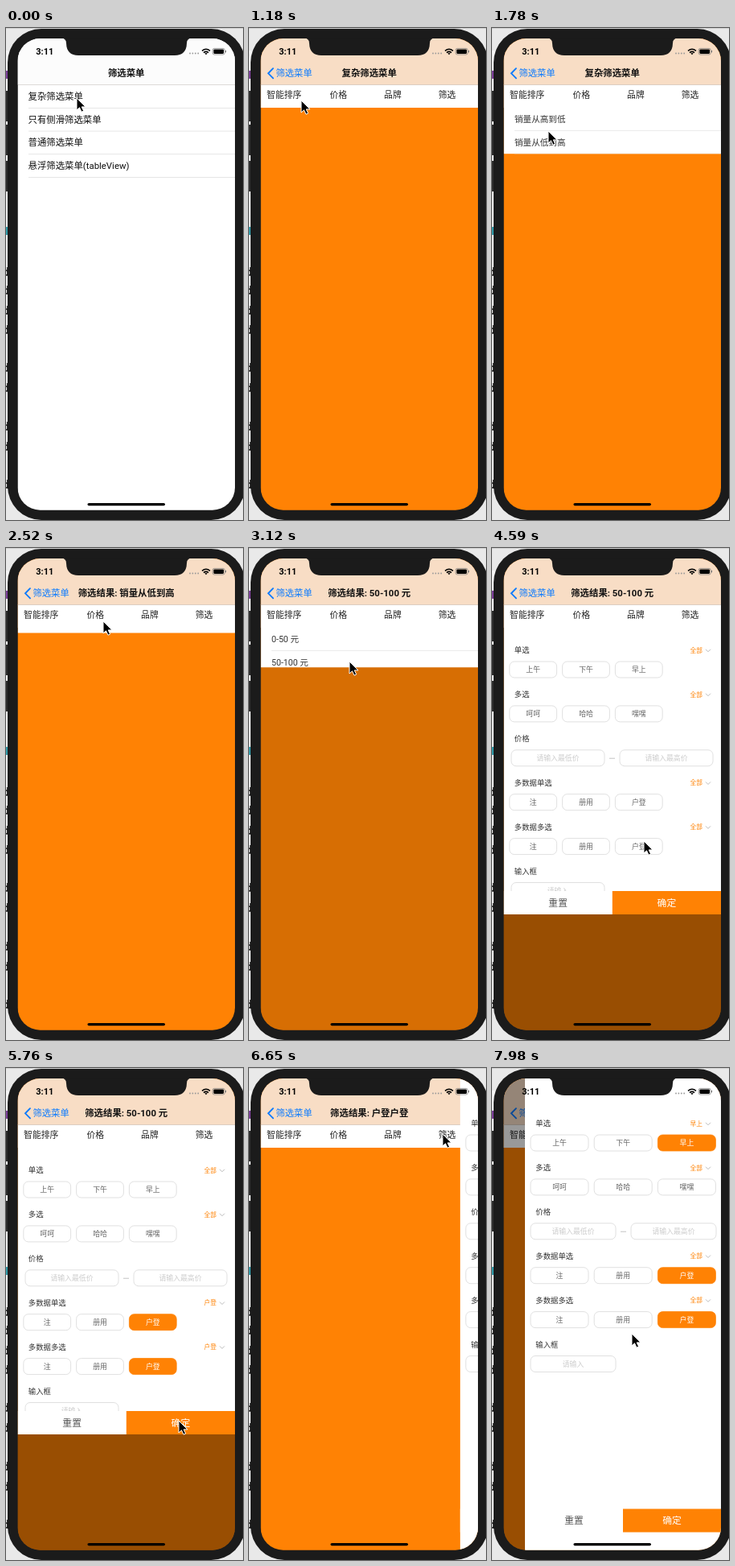
Write an HTML page that moves like this. It is 295 by 611 pixels and loops after 8000 ms.

```html
<!DOCTYPE html>
<html lang="zh-CN">
<head>
<meta charset="utf-8">
<title>筛选菜单</title>
<style>
html, body { margin: 0; width: 100%; height: 100%; overflow: hidden; background: #e9e9e9; }
svg { display: block; width: 295px; height: 611px; }
text { font-family: Roboto, "Noto Sans CJK SC", "Noto Sans CJK", sans-serif; white-space: pre; }
</style>
</head>
<body>
<svg id="stage" viewBox="0 0 295 611"></svg>
<script>
const LOOP = 8000, STEP = 147.5, LEFT = 14.5, WIDTH = 270.5;
const ORANGE = '#ff8204', BLUE = '#0a7aff', BEZEL = '#1b1b1b';
const stage = document.getElementById('stage');

const ramp = (t, start, span) => Math.min(1, Math.max(0, (t - start) / span));
const ease = (t, start, span) => { const p = ramp(t, start, span); return p * p * (3 - 2 * p); };
const mix = (a, b, p) => a + (b - a) * p;

const rect = (x, y, w, h, fill, more = '') =>
  `<rect x="${x}" y="${y}" width="${w}" height="${h}" fill="${fill}" ${more}/>`;
const path = (d, fill, more = '') => `<path d="${d}" fill="${fill}" ${more}/>`;
const line = (x, y, w, color) => rect(x, y, w, 0.7, color);
const text = (s, x, mid, size, fill, anchor = 'start', more = '') =>
  `<text x="${x}" y="${mid + size * 0.36}" font-size="${size}" fill="${fill}" text-anchor="${anchor}" ${more}>${s}</text>`;
const group = (more, body) => `<g ${more}>${body}</g>`;
const shift = (x, y, body) => group(`transform="translate(${x} ${y})"`, body);
const shade = (y, h, amount) => rect(LEFT, y, WIDTH, h, '#000', `opacity="${0.4 * amount}"`);

// Pointer stops: time, x, y
const stops = [
  [600, 88, 87], [1190, 65, 90], [1330, 65, 90], [1780, 70, 128], [1930, 75, 142],
  [2220, 80, 140], [2517, 121, 91], [2600, 121, 91], [2950, 125, 141], [3120, 125, 141],
  [3500, 167, 91], [3697, 167, 91], [3992, 180, 162], [4582, 189, 364], [4870, 189, 364],
  [5025, 190, 318], [5300, 190, 318], [5620, 215, 438], [5765, 215, 438], [6350, 241, 82],
  [6650, 241, 82], [7090, 240, 88], [7385, 238, 92], [7532, 221, 199], [7975, 174, 330]
];

function pointer(t) {
  let i = 1;
  while (i < stops.length - 1 && t > stops[i][0]) i++;
  const [t0, x0, y0] = stops[i - 1], [t1, x1, y1] = stops[i];
  const p = ramp(t, t0, t1 - t0);
  return shift(mix(x0, x1, p), mix(y0, y1, p), path('M0 0V15L3.5 11.8L6 17.2L8.6 16L6.2 10.9H11Z',
    '#000', 'stroke="#fff" stroke-width="1" stroke-linejoin="round"'));
}

function box(x, y, w, label, on, color = '#666') {
  return rect(x, y, w, 20, on ? ORANGE : '#fff', `rx="6" stroke="${on ? ORANGE : '#d8d8d8'}" stroke-width=".8"`) +
    text(label, x + w / 2, y + 10, 8.9, on ? '#fff' : color, 'middle');
}

// Filter sections, with the first heading centred on y = 0
function form(o) {
  const field = (x, y, label) => box(x, y, o.fieldWidth, label, false, '#ccc');
  const rows = [
    ['单选', '上午', '下午', '早上'], ['多选', '呵呵', '哈哈', '嘿嘿'], ['价格'],
    ['多数据单选', '注', '册用', '户登'], ['多数据多选', '注', '册用', '户登'], ['输入框']
  ];
  return rows.map(([name, ...choices], i) => {
    let s = text(name, 13.3, 0, 9.4, '#333');
    if (choices.length) {
      s += text(o.tags[i] || '全部', o.tagX, 0, 7.7, ORANGE, 'end') +
        path(`M${o.tagX + 4} -1.2l3 3l3 -3`, 'none', 'stroke="#aaa" stroke-width=".8"');
      s += choices.map((c, k) => box(o.x + k * o.pitch, 14, o.width, c, k == 2 && o.on[i])).join('');
    } else if (i == 2) {
      s += field(o.fieldX, 14, '请输入最低价') + field(o.fieldX2, 14, '请输入最高价') +
        line(o.fieldX2 - 13, 24, 7, '#aaa');
    } else s += field(o.fieldX, 14, '请输入');
    return shift(0, i * 54.9, s);
  }).join('');
}

function buttons(y, split, width) {
  return rect(0, y, split, 29, '#fff') + rect(split, y, width - split, 29, ORANGE) +
    text('重置', split / 2, y + 14.5, 11.8, '#555', 'middle') +
    text('确定', (split + width) / 2, y + 14.5, 11.8, '#fff', 'middle');
}

function list(items) {
  return items.map((s, i) => text(s, 13.5, 14.4 + i * 28.7, 10.6, '#333') +
    line(13.5, 28 + i * 28.7, WIDTH, '#e4e4e4')).join('');
}

// Menus that unfold below the tabs
const menus = [
  { open: 1270, close: 2000, full: 57.4, body: () => list(['销量从高到低', '销量从低到高']) },
  { open: 2430, close: 2950, full: 86.1, body: () => list(['0-50 元', '50-100 元', '100-150 元']) },
  { open: 3568, close: 5790, full: 356, body: (t, h) => shift(0, 28, form({
      x: 7.3, pitch: 65.8, width: 58.8, fieldX: 9.5, fieldX2: 144.5, fieldWidth: 116, tagX: 247.5,
      on: { 3: t >= 5310, 4: t >= 4870 }, tags: { 3: t >= 5310 && '户登', 4: t >= 4870 && '户登' }
    })) + buttons(h - 29, 135.3, WIDTH) }
];

function dropdown(t) {
  return menus.map(m => {
    const h = m.full * (ease(t, m.open, 514) - ease(t, m.close, 350));
    if (h <= 0) return '';
    const dim = ramp(t, m.open + 514, 200) * (1 - ramp(t, m.close, 300));
    return shade(99, 500, dim) +
      `<clipPath id="fold">${rect(0, 0, WIDTH, h, '#000')}</clipPath>` +
      shift(LEFT, 99, group('clip-path="url(#fold)"', rect(0, 0, WIDTH, h, '#fff') + m.body(t, h)));
  }).join('');
}

function drawer(t) {
  const p = ease(t, 6552, 514), w = 244;
  if (!p) return '';
  return shade(13, 586, ramp(t, 7066, 200)) + shift(285 - w * p, 0, rect(0, 13, w, 586, '#fff') +
    shift(0, 69, form({
      x: 7, pitch: 79.2, width: 72, fieldX: 7, fieldX2: 132, fieldWidth: 106, tagX: 221,
      on: { 0: t >= 7380, 3: true, 4: true }, tags: { 0: t >= 7380 && '早上' }
    })) + buttons(547.5, 122, w));
}

function home(t) {
  const rows = ['复杂筛选菜单', '只有侧滑筛选菜单', '普通筛选菜单', '悬浮筛选菜单(tableView)'];
  return rect(LEFT, 13, WIDTH, 586, '#fff') + rect(LEFT, 13, WIDTH, 57, '#fcfcfc') +
    (t >= 600 ? rect(LEFT, 71, WIDTH, 28.5, '#d9d9d9') : '') +
    rows.map((s, i) => text(s, 27.5, 84.7 + i * 28.8, 11.4, '#111') +
      line(28, 99 + i * 28.7, 257, '#dcdcdc')).join('');
}

function page() {
  const tabs = ['智能排序', '价格', '品牌', '筛选'];
  return rect(LEFT, 13, WIDTH, 586, ORANGE) + rect(LEFT, 13, WIDTH, 57.5, '#f8ddc5') +
    rect(LEFT, 70.5, WIDTH, 28.5, '#fff') +
    tabs.map((s, i) => text(s, 43.7 + i * 67.6, 83.2, 10.8, '#222', 'middle')).join('');
}

function navigation(t, p) {
  const bold = 'font-weight="600"';
  const result = t < 2000 ? '' : t < 2950 ? '销量从低到高' : t < 5790 ? '50-100 元' : '户登户登';
  const title = result ? '筛选结果: ' + result : '复杂筛选菜单';
  return line(LEFT, 70, WIDTH, '#cfcbc8') +
    group(`opacity="${1 - p}"`, text('筛选菜单', mix(149.7, 56, p), 56, 11.4, '#111', 'middle', bold)) +
    group(`opacity="${p}"`, text(title, mix(250, 149.7, p), 56, 11.4, '#111', 'middle', bold) +
      text('筛选菜单', mix(128, 33.5, p), 56, 11.3, BLUE) +
      path('M30 50.2L24 56.3L30 62.4', 'none', `stroke="${BLUE}" stroke-width="1.9" stroke-linecap="round"`));
}

function status() {
  const dots = [0, 1, 2, 3].map(i => `<circle cx="${229 + i * 3.4}" cy="31.5" r=".9" fill="#999"/>`).join('');
  const arc = (r, y) => path(`M${249 - r} ${y}Q249 ${y - r * 0.8} ${249 + r} ${y}`, 'none', 'stroke="#000" stroke-width="1.6"');
  return text('3:11', 48.3, 29.3, 11, '#000', 'middle', 'font-weight="600"') + dots +
    arc(5, 28.3) + arc(3, 30.6) + path('M247.3 31.6Q249 30.2 250.7 31.6L249 33.3Z', '#000') +
    rect(257.2, 25.4, 15, 7.6, 'none', 'rx="2" stroke="#777" stroke-width=".7"') +
    rect(258.4, 26.5, 12.6, 5.4, '#000', 'rx="1.1"') + rect(273, 27.8, 1, 2.8, '#777', 'rx=".5"');
}

function backdrop() {
  const blocks = [78, 120, 165].map(y => rect(0, y, 4, 38, '#2b2b2b')).join('');
  const letters = [303, 326, 351, 375, 422, 447, 495, 520, 567]
    .map(y => text('d', -4, y, 14, '#111', 'start', 'font-weight="700"')).join('');
  return rect(0, 0, 295, 611, '#e9e9e9') + rect(0, 0, 295, 1, '#cfcfcf') + rect(0, 28, 3, 50, '#f6f6f6') +
    rect(0, 53, 2, 10, '#7b3f98') + blocks + rect(0, 247, 2, 10, '#2f9aa8') + letters +
    rect(2, 1, 295.5, 610, BEZEL, 'rx="42"');
}

function scene(t) {
  const p = ease(t, 660, 380);
  const screen = (p < 1 ? shift(-80 * p, 0, home(t)) : '') +
    (p ? shift(WIDTH * (1 - p), 0, page()) : '') +
    navigation(t, p) + dropdown(t) + drawer(t) + status() +
    rect(101.5, 590, 96.5, 3.2, '#000', 'rx="1.6"');
  return `<clipPath id="glass">${rect(LEFT, 13, WIDTH, 585.7, '#000', 'rx="28"')}</clipPath>` + backdrop() +
    group('clip-path="url(#glass)"', screen) +
    path('M69 12.5Q75 13 75 19Q75.5 34 90 34H210Q224.500 34 225 19Q225 13 231 12.5Z', BEZEL) + pointer(t);
}

// The screen refreshes in fixed steps after the opening pause
let shown = null;
function tick(now) {
  const k = Math.max(-1, Math.floor((now % LOOP - 590) / STEP));
  if (k !== shown) {
    shown = k;
    stage.innerHTML = scene(k < 0 ? 0 : 600 + k * STEP);
  }
  requestAnimationFrame(tick);
}
tick(performance.now());
</script>
</body>
</html>
```
